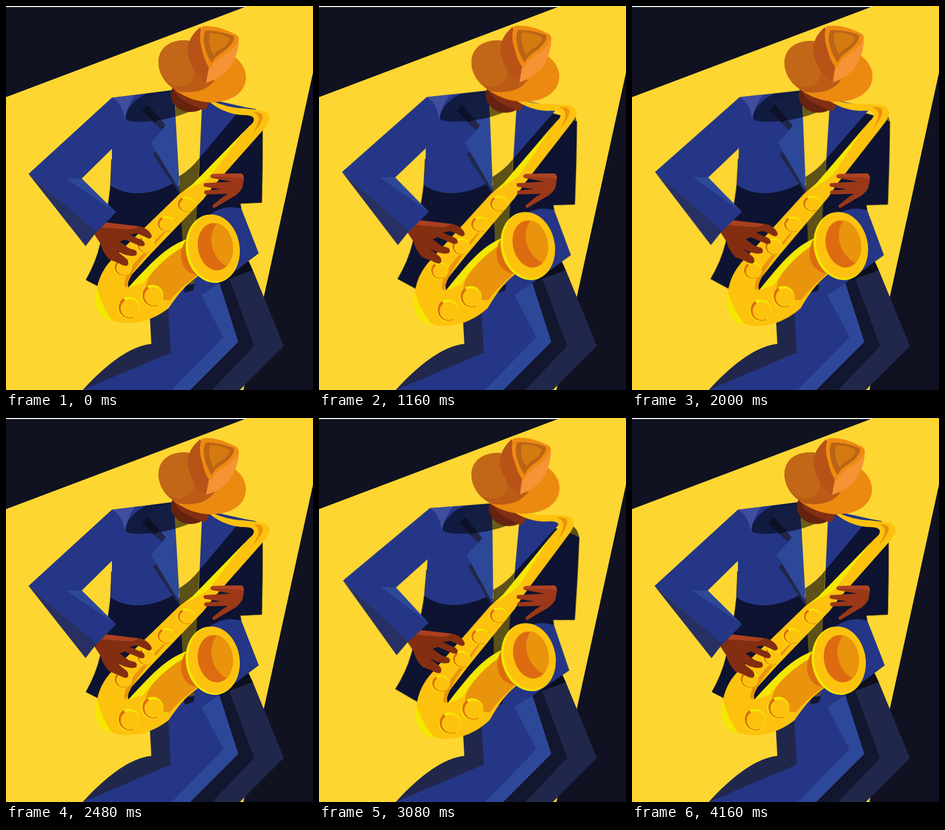
Write an HTML page that moves like this. It is 600 px wide and 750 px high and loops after 4.76 s.

```html
<!DOCTYPE html>
<html lang="en">
<head>
<meta charset="utf-8">
<title>Saxophone player</title>
<style>
html, body { margin: 0; width: 100%; height: 100%; overflow: hidden; background: #fed632; }
svg { display: block; width: 100vw; height: 100vh; }
.sax, .body, .head, .hand { animation: 4760ms step-end infinite; }
.sax { animation-name: sax; transform-origin: 327px 408px; }
.body { animation-name: body; transform-origin: 275px 385px; }
.head { animation-name: head; transform-origin: 350px 110px; }
.hand { animation-name: hand; }

@keyframes sax {
  0%, 52.1%, 87.39%, 100% { transform: rotate(0deg); }
  15.96%, 48.73%, 56.3%, 84.03% { transform: rotate(-1.22deg); }
  21%, 45.37%, 57.98%, 80.67% { transform: rotate(-2.44deg); }
  24.36%, 42.01%, 61.34%, 77.31% { transform: rotate(-3.66deg); }
  27.73%, 64.7% { transform: rotate(-4.87deg); }
}
@keyframes body {
  0%, 45.37%, 80.67%, 100% { transform: rotate(0deg); }
  24.36%, 42.01%, 61.34%, 77.31% { transform: rotate(.93deg); }
  27.73%, 64.7% { transform: rotate(2.64deg); }
}
@keyframes head {
  0%, 48.73%, 84.03%, 100% { transform: rotate(0deg); }
  24.36%, 45.37%, 61.34%, 80.67% { transform: rotate(-1.2deg); }
  27.73%, 42.01%, 64.7%, 77.31% { transform: translateY(1px) rotate(-2.4deg); }
}
@keyframes hand {
  0%, 45.37%, 80.67%, 100% { transform: translateY(0); }
  24.36%, 42.01%, 61.34%, 77.31% { transform: translateY(-4.5px); }
  27.73%, 64.7% { transform: translateY(-9px); }
}

.ink { fill: #101221; }
.dark { fill: #0d1330; }
.dusk { fill: #12162f; }
.slate { fill: #21274b; }
.blue { fill: #243685; }
.light { fill: #2e4899; }
.sun { fill: #fed632; }
.olive { fill: #5c5116; }
.gold { fill: #fdc20e; }
.lemon { fill: #f4e800; }
.amber { fill: #ea930d; }
.rust { fill: #dd6c10; }
</style>
</head>
<body>
<svg viewBox="0 0 600 750" preserveAspectRatio="none">
  <defs>
    <g id="key">
      <circle class="lemon" r="18"/>
      <path class="rust" d="M-8 -16A18 18 0 0 0 9 15.6Z"/>
      <circle class="gold" cx="2.200" cy="1" r="15"/>
    </g>
  </defs>

  <!-- spotlight -->
  <path class="sun" d="M0 0H600V750H0Z"/>
  <path fill="#fff" d="M0 0H472L466 2H0Z"/>
  <path class="ink" d="M0 2H467L0 178ZM600 130V750H464Z"/>

  <!-- legs -->
  <path class="slate" d="M150 750C190 706 240 664 284 660L280 585H330V750Z"/>
  <path class="blue" d="M150 750L322 677L317 585L345 520H417L450 656L360 750Z"/>
  <path class="slate" d="M430 520L475 500L482 515L543 664L457 750H395L480 664Z"/>
  <path class="dusk" d="M415 538L436 532L485 664L403 750H358L452 656Z"/>
  <path class="light" d="M382 565L417 541L454 656L360 750H324L425 647Z"/>
  <path fill="#0d0f1d" d="M410 535L474 498L482 516L436 533L417 541Z"/>

  <!-- jacket -->
  <g class="body">
    <path class="olive" d="M470 198L487 201Q498 206 501 222L501 240L470 215Z"/>
    <path class="dark" stroke="#5c5116" d="M206 300L204 350Q200 395 184 465Q176 500 156 535L204 560L250 575L345 548L400 410Q430 392 460 396L458 386L500 384Q502 300 501.500 222L483 214L451 206L380 200Z"/>
    <path class="blue" d="M395 410Q425 386 460 396L494 483L417 541L370 558L378 450Z"/>
    <path class="blue" d="M380 215L388 180L425 188L487 202L460 200L372 304Z"/>
    <path class="blue" d="M207 179L328 164L345 335Q300 366 255 366Q225 365 204 350L207 300Z"/>
    <path class="slate" d="M287 290L294 284L340 353V368Z"/>
    <path class="sun" d="M328 185L383 195L376 350H338Z"/>
    <path class="olive" d="M338 333Q362 318 378 297L373 400L368 542L349 545L344 440Z"/>
    <path class="dusk" d="M348 546L369 543L366 555L349 560Z"/>
    <path class="light" d="M330 192L299 216L312 234L283 267L338 358V333Z"/>
    <path class="slate" d="M285 225L295 213L312 233L305 242Z"/>
    <path fill="#111a3f" d="M234 220C233 203 250 183 275 171L328 164L331 216C295 226 238 231 234 220Z"/>
    <path fill="#141d42" d="M275 188L298 172L328 164L331 215L300 222Z"/>
    <path fill="#0d1127" d="M266 205L277 193L302 221L290 227Z"/>
    <path fill="#6b5d17" d="M330 190H380Q376 203 331 216Z"/>
    <path fill="#66230f" d="M325 160Q320 172 324 184C332 200 345 207 362 207Q377 206 384 200L397 190V160Z"/>
    <path fill="#822f13" d="M329 160C329 178 348 188 383 202L390 203L398 188L390 160Z"/>
  </g>

  <!-- saxophone -->
  <g class="sax">
    <path class="gold" d="M390 180C425 196 445 199 465 200L490 203C508 204 516 211 515 221C512 234 503 241 492 254L405 352L386 377L334 431L283 484L242 529Q237 537 239 550C280 505 308 476 355 455L375 528C350 545 335 565 318 590C290 612 255 624 220 618C185 610 170 590 178 550C183 525 195 505 215 487L338 368L365 348L442 269L476 234Q486 227 484 219Q481 213 466 213C445 213 420 205 400 189Z"/>
    <path class="amber" d="M482 207Q501 207 502 215Q503 226 481 251Q494 230 494 220Q492 210 482 207Z"/>
    <path class="lemon" d="M466 244L442 269L365 348L348 362Q380 347 397 334Q420 305 466 244Z"/>
    <path class="amber" d="M340 408L280 470C252 500 232 520 231 547L237 550C237 535 252 512 284 474Z"/>
    <path class="amber" d="M352 462C315 482 290 510 277 535Q270 550 275 568L320 575C340 552 355 540 374 526Z"/>
    <path class="lemon" d="M357 454C310 470 280 506 240 550L268 541C290 515 310 490 354 466Z"/>
    <path class="lemon" d="M178 550C168 580 180 612 208 616Q186 586 178 550Z"/>
    <path class="rust" d="M354 455Q342 468 342 490Q345 520 374 526L390 500Z"/>
    <g transform="rotate(-9 404 474)">
      <ellipse class="lemon" cx="404" cy="474" rx="52.500" ry="67"/>
      <ellipse class="gold" cx="406.500" cy="473" rx="50" ry="65.500"/>
      <ellipse class="rust" cx="409.500" cy="471" rx="34" ry="46.500"/>
    </g>
    <path class="amber" d="M413 424C434 430 445 455 444 478Q442 499 430 508C400 490 392 448 413 424Z"/>
    <use href="#key" transform="translate(352 388) scale(1 .86)"/>
    <use href="#key" transform="translate(312.500 426) scale(1 .86)"/>
    <use href="#key" transform="translate(273 467) scale(1 .92)"/>
    <use href="#key" transform="translate(228.500 511) scale(1 .92)"/>
    <use href="#key" transform="translate(239.500 589.500) scale(1.2)"/>
    <use href="#key" transform="translate(286 566) scale(1.2)"/>
  </g>

  <!-- hands -->
  <path fill="#9a3818" d="M404 328L460 327Q466 330 465 338L462 355Q455 368 440 375L408 394Q402 395 404 389L425 372Q437 366 430 367L390 368Q384 364 390 360L420 358L388 353Q384 349 388 346L440 343L402 336Q396 332 404 328Z"/>
  <path fill="#b04324" d="M404 328L460 327Q466 330 464 337Q440 332 400 334Q397 331 404 328Z"/>
  <g class="hand">
    <path fill="#832e11" d="M190 423L258 430C272 431 284 442 285 450C283 456 277 455 270 450L256 444L242 447L267 458Q273 463 270 468Q265 471 258 467L232 456L222 460L240 473L253 477Q258 482 254 487Q246 490 230 485L216 478L236 494Q242 501 237 507Q231 509 220 502L202 495Q188 480 185 465L172 445Z"/>
    <path fill="#ab4020" d="M190 422L258 430Q252 437 238 436L185 432Z"/>
  </g>

  <!-- near sleeve -->
  <g class="body">
    <path class="blue" d="M207 179L44 328L177 442L215 403L148 337L207 279L215 240V181Z"/>
    <path fill="#283063" d="M44 328L155.500 469L177 441Z"/>
    <path class="light" d="M118 337H148L215 403Z"/>
    <path fill="#404e9d" d="M207 179L252 174Q236 196 232 222Q228 190 207 179Z"/>
  </g>

  <!-- hat -->
  <g class="head">
    <path fill="#ec890f" d="M298 110C298 82 320 66 352 67L440 95C458 105 469 122 469 140C468 170 440 188 400 188C350 188 298 150 298 110Z"/>
    <path fill="#bb5b16" d="M298 110C298 82 320 66 352 67L370 70L407 146Q385 174 338 167C310 155 298 130 298 110Z"/>
    <path fill="#c26717" d="M298 110C298 82 320 66 352 67L362 70L368 130Q365 157 335 157C310 153 298 130 298 110Z"/>
    <path fill="#b85318" d="M380 41Q352 64 355 92Q362 130 391 150L400 120Q388 85 380 41Z"/>
    <path fill="#f59335" d="M391 150L397 118L450 70L455 62Q456 88 441 115Q425 140 391 150Z"/>
    <path fill="#ee8a10" d="M383 40Q375 60 383 85Q388 107 396 119Q399 123 402 119Q408 107 424 97Q448 82 454 68Q457 58 445 54Q410 36 383 40Z"/>
    <path fill="#ba6416" d="M390 48Q384 60 388 78Q392 97 402 112Q407 100 420 92Q440 80 446 64Q446 57 437 56Q412 47 390 48Z"/>
    <path fill="#d47a10" d="M398 53Q395 70 400 84L406 97Q409 90 418 85Q434 77 438 64Q422 52 398 53Z"/>
  </g>
</svg>
</body>
</html>
```
